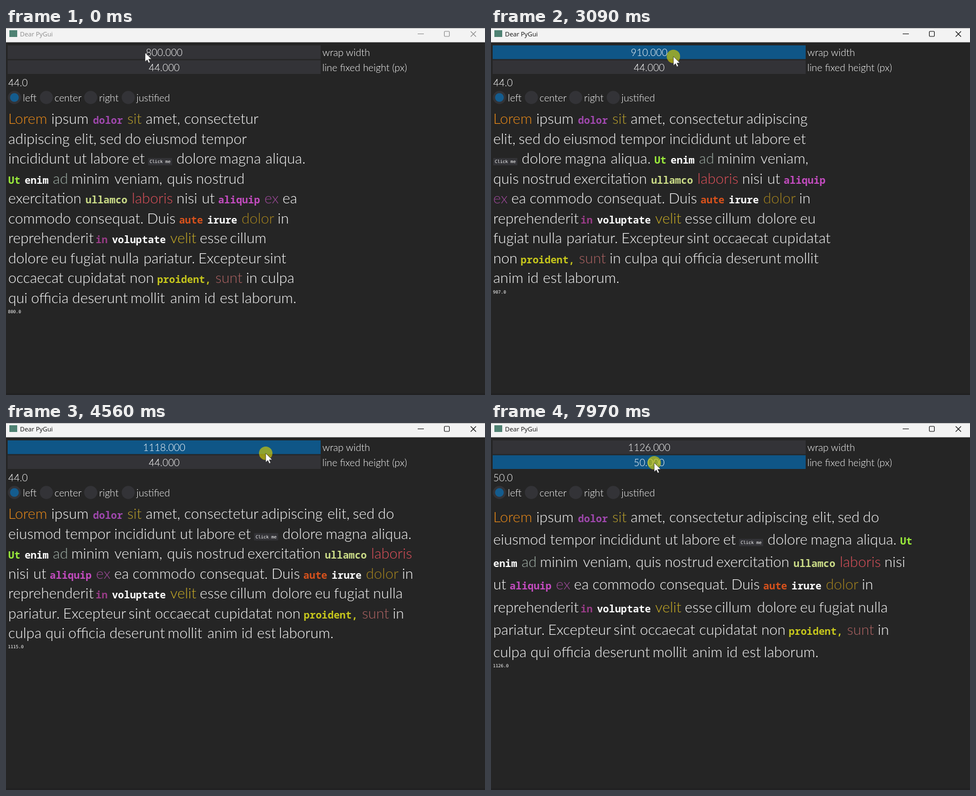
Recreate the animation shown at these times as an HTML page. Size 854x655 px, loop 8000 ms.

```html
<!DOCTYPE html>
<html lang="en">
<head>
<meta charset="utf-8">
<title>Text wrapping demo</title>
<style>
  html, body { margin: 0; width: 100%; height: 100%; overflow: hidden; background: #252525; }
  svg { display: block; width: 100%; height: 100%; }
  text { fill: #fff; white-space: pre; }
  .ui { font: 300 17.6px Lato, "Open Sans", sans-serif; }
  .body { font: 300 26px Lato, "Open Sans", sans-serif; }
  .mono { font: 600 17.8px "Noto Sans Mono", "DejaVu Sans Mono", monospace; }
  .tiny { font: 7.75px "DejaVu Sans Mono", monospace; }
  .title { font: 11.2px "Open Sans", sans-serif; }
  .mid { text-anchor: middle; }
</style>
</head>
<body>
<svg id="stage" viewBox="0 0 854 655">
  <rect width="854" height="655" fill="#252525"/>
  <rect y="652" width="854" height="3" fill="#212122"/>
  <rect width="854" height="25.5" fill="#f3f3f3"/>
  <rect width="854" height="1" fill="#b4b4b4"/>
  <rect x="6" y="4" width="14" height="12" fill="#4f8273"/>
  <text id="title" class="title" x="25" y="14.5">Dear PyGui</text>
  <g id="buttons" fill="none" stroke-width="1.1">
    <path d="M734 10.5h11M828.5 6l9.5 9.5M838 6l-9.5 9.5"/>
    <rect x="781.5" y="6" width="9" height="9" rx="1.2"/>
  </g>
  <rect id="row1" x="3" y="31" width="558" height="24.5"/>
  <rect id="row2" x="3" y="57.5" width="558" height="24.5"/>
  <text id="wrapValue" class="ui mid" x="282" y="50"></text>
  <text id="heightValue" class="ui mid" x="282" y="77"></text>
  <text class="ui" x="564" y="50">wrap width</text>
  <text class="ui" x="564" y="77">line fixed height (px)</text>
  <text id="heightLabel" class="ui" x="4" y="104"></text>
  <g id="radios"></g>
  <g id="words"></g>
  <text id="wrapLabel" class="tiny" x="3.5"></text>
  <circle id="press" r="12" fill="#cdc80a" fill-opacity=".68"/>
  <path id="cursor" d="M0 0v16.3l3.8-3.6 2.5 5.6 2.6-1.1-2.5-5.5h5.3z" fill="#fff" stroke="#111" stroke-width=".6"/>
</svg>
<script>
const LOOP = 8000, LEFT = 4, GAP = 7.8, MONO = 10.67, SCALE = 2 / 3;
const IDLE = '#333337', HOVER = '#225376', ACTIVE = '#0f5687';
const $ = id => document.getElementById(id);

// word/advance/colour; a leading * marks a monospaced word, # the button
const COPY = `Lorem/69/ee8c18 ipsum/66.5 *dolor/a048ae sit/25/bca22c amet,/61 consectetur/129.5
adipiscing/110 elit,/37.5 sed/37 do/27 eiusmod/93.5 tempor/80 incididunt/109 ut/21.5 labore/67
et/20.5 #button/43 dolore/69 magna/74 aliqua./70 *Ut/9cee3c *enim ad/25/a3b3aa minim/69 veniam,/86
quis/44 nostrud/84 exercitation/130 *ullamco/ccdd88 laboris/72/e2525c nisi/37 ut/21.5
*aliquip/c44cc0 ex/24.5/a04a9c ea/25 commodo/112 consequat./120 Duis/49 *aute/d9521c *irure
dolor/56.5/a8861e in/19 reprehenderit/148 *in/9a3c88 *voluptate velit/45/cdb026 esse/46 cillum/67
dolore/69 eu/26 fugiat/62 nulla/53 pariatur./90 Excepteur/109 sint/39 occaecat/98 cupidatat/103
non/41 *proident,/c8c81c sunt/47/b06464 in/19 culpa/58.5 qui/33 officia/65.5 deserunt/96
mollit/63 anim/53 id/20 est/31 laborum./97`;

// time, pointer x, pointer y, wrap width, line height
const KEYS = [
  [0, 248, 44, 800, 44], [1300, 248, 44, 800, 44], [1480, 253, 44, 800, 44],
  [2090, 264, 45, 816, 44], [2300, 280, 47, 846, 44], [2440, 284, 48, 851, 44],
  [2910, 311, 50, 888, 44], [3560, 362, 53, 966, 44], [3680, 366, 54, 970, 44],
  [3760, 372, 54, 978, 44], [3920, 405, 54, 1030, 44], [4090, 426, 54, 1060, 44],
  [4560, 463, 54, 1118, 44], [4710, 468, 54, 1126, 44], [6250, 468, 54, 1126, 44],
  [6500, 420, 112, 1126, 44], [6700, 345, 121, 1126, 44], [6950, 281, 81, 1126, 44],
  [7010, 281, 73, 1126, 44], [7060, 281, 71, 1126, 44], [7800, 281, 71, 1126, 44],
  [7880, 286.5, 71, 1126, 44.4], [7970, 291, 71, 1126, 50]
];

function el(parent, tag, attrs, text) {
  const node = document.createElementNS('http://www.w3.org/2000/svg', tag);
  for (const k in attrs) node.setAttribute(k, attrs[k]);
  if (text) node.textContent = text;
  return parent.appendChild(node);
}

function makeWord(token) {
  let [word, ...rest] = token.split('/');
  if (word[0] === '#') {
    const node = el($('words'), 'g', {});
    el(node, 'rect', { y: -10, width: 43, height: 13, fill: IDLE });
    el(node, 'text', { class: 'tiny', x: 2.8, y: -0.8 }, 'Click me');
    return { node, width: +rest[0] };
  }
  const mono = word[0] === '*';
  if (mono) word = word.slice(1);
  const width = mono ? word.length * MONO : +rest.shift();
  const node = el($('words'), 'text', { class: mono ? 'mono' : 'body' }, word);
  if (rest[0]) node.style.fill = '#' + rest[0];
  return { node, width };
}

const words = COPY.split(/\s+/).map(makeWord);

[['left', 15, 30], ['center', 72, 86.5], ['right', 151, 166], ['justified', 218, 232.5]]
  .forEach(([label, cx, x], i) => {
    el($('radios'), 'circle', { cx, cy: 124, r: 11.7, fill: IDLE });
    if (!i) el($('radios'), 'circle', { cx, cy: 124, r: 7.8, fill: '#145c8e' });
    el($('radios'), 'text', { class: 'ui', x, y: 130.5 }, label);
  });

function sample(t) {
  const i = KEYS.findIndex(k => k[0] > t);
  if (i < 0) return KEYS[KEYS.length - 1].slice(1);
  if (!i) return KEYS[0].slice(1);
  const a = KEYS[i - 1], b = KEYS[i], p = (t - a[0]) / (b[0] - a[0]);
  return a.slice(1).map((v, n) => v + (b[n + 1] - v) * p);
}

function layout(wrap, height) {
  const limit = LEFT + wrap * SCALE, extra = height - 44;
  const pitch = 35.55 + extra * 0.79;
  let x = LEFT, y = 171 + extra * 0.92;
  for (const { node, width } of words) {
    if (x > LEFT && x + width > limit) {
      x = LEFT;
      y += pitch;
    }
    node.setAttribute('transform', `translate(${x.toFixed(2)} ${y.toFixed(2)})`);
    x += width + GAP;
  }
  $('wrapLabel').setAttribute('y', y + 18.1);
  $('wrapLabel').textContent = wrap.toFixed(1);
}

function rowColour(pressed, hovered) {
  return pressed ? ACTIVE : hovered ? HOVER : IDLE;
}

function draw(t) {
  const [x, y, wrap, rawHeight] = sample(t);
  const height = Math.round(rawHeight);
  const focused = t >= 760;
  const drag1 = focused && t < 5890, drag2 = t >= 7290;
  const free = focused && !drag1 && !drag2;

  $('title').style.fill = focused ? '#111' : '#8c8c8c';
  $('buttons').setAttribute('stroke', focused ? '#111' : '#8c8c8c');
  $('row1').setAttribute('fill', rowColour(drag1, free && y < 55.5));
  $('row2').setAttribute('fill', rowColour(drag2, free && y > 57.5 && y < 81));
  $('wrapValue').textContent = Math.round(wrap).toFixed(3);
  $('heightValue').textContent = height.toFixed(3);
  $('heightLabel').textContent = height.toFixed(1);

  // the paragraph trails the slider slightly
  layout(Math.round(sample(Math.max(0, t - 25))[2]), height);

  const at = `translate(${x.toFixed(2)} ${y.toFixed(2)})`;
  $('cursor').setAttribute('transform', at);
  $('press').setAttribute('transform', at);
  $('press').setAttribute('visibility', drag1 || drag2 ? 'visible' : 'hidden');
}

const start = performance.now();
function tick() {
  draw((performance.now() - start) % LOOP);
  requestAnimationFrame(tick);
}
tick();
</script>
</body>
</html>
```
